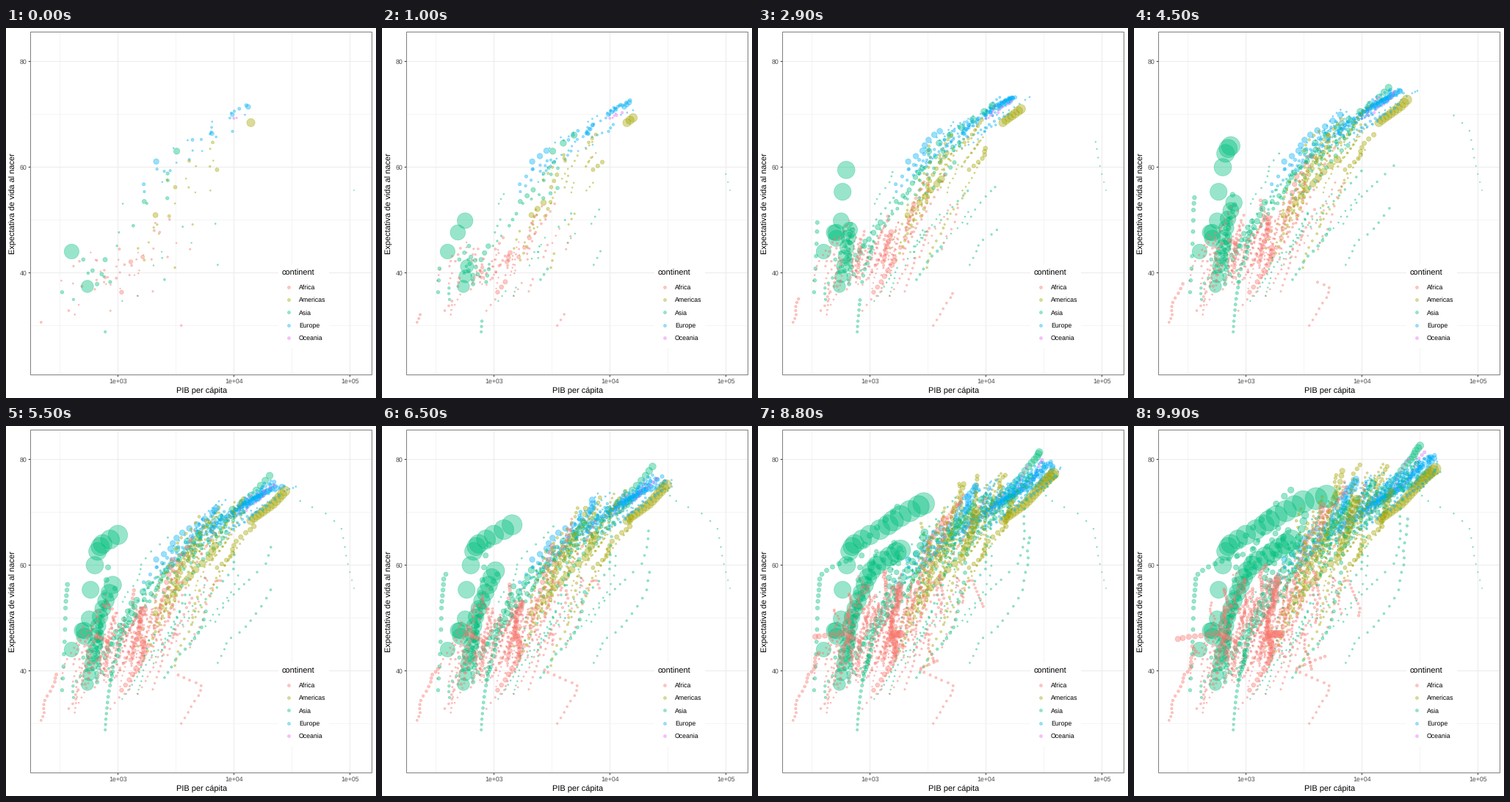
Recreate the animation shown at these times as a matplotlib script. Size 504 by 504 pixels, loop 10 s.

```python
import numpy as np
import matplotlib.pyplot as plt
from matplotlib.animation import FuncAnimation
from matplotlib.colors import to_rgba
from matplotlib.patches import Rectangle

plt.rcParams["font.family"] = "Liberation Sans"
plt.rcParams["text.hinting"] = "none"

SIZE, FRAMES, TRAIL_STEP, KEYS = 504, 100, 5, 12
LEFT, RIGHT, TOP, BOTTOM = 33.5, 498.5, 5.5, 472.5
MAX_POP = 1319
TINTS = {"Africa": to_rgba("#F8766D", 0.4), "Americas": to_rgba("#A3A500", 0.4),
         "Asia": to_rgba("#00BF7D", 0.4), "Europe": to_rgba("#00B0F6", 0.4),
         "Oceania": to_rgba("#E76BF3", 0.4)}

rng = np.random.default_rng(11)
tracks, tints = [], []


def px(log_income):
    return LEFT + (log_income - 2.2487) * (RIGHT - LEFT) / 2.9401


def py(life):
    return BOTTOM - (life - 20.649) * (BOTTOM - TOP) / 64.904


def radius(pop):
    size = 0.1 + 13.9 * np.sqrt(np.clip(pop - 0.06, 0, None) / MAX_POP)
    return 0.375 * (size * 2.845 + 0.945)


def bridge(scale):
    """Random walk over the key years that starts and ends at zero."""
    walk = np.cumsum(rng.normal(0, scale, KEYS))
    return walk - np.linspace(walk[0], walk[-1], KEYS)


def bubble(continent, pop, growth, knots, wobble=1.0):
    """Add one bubble; knots are (log income, life), evenly spaced in time."""
    knots = np.asarray(knots, float)
    t, at = np.linspace(0, 1, KEYS), np.linspace(0, 1, len(knots))
    income = np.interp(t, at, knots[:, 0]) + bridge(0.025) * wobble
    life = np.interp(t, at, knots[:, 1]) + bridge(0.25) * wobble
    r = radius(pop * (1 + (growth - 1) * t))
    time = np.linspace(0, 1, FRAMES)
    tracks.append([np.interp(time, t, v) for v in (px(income), py(life), r)])
    tints.append(TINTS[continent])


def leader(continent, pop, growth, *knots, wobble=0.3):
    bubble(continent, pop, growth, [(np.log10(g), life) for g, life in knots], wobble)


def cohort(continent, n, pop, growth, spread, poor, rich):
    """Add n bubbles scattered between the poorest and the richest path."""
    poor, rich = np.array(poor), np.array(rich)
    for u in np.linspace(0, 1, n):
        path = poor + (rich - poor) * u + rng.normal(0, spread, 2)
        size = np.clip(pop * np.exp(rng.normal(0, 1)), 0.1, 65)
        bubble(continent, size, growth, path)


# Bubbles that stand out
leader("Asia", 556, 2.37, (400, 44), (576, 50.5), (488, 44.5), (613, 58.4),
       (677, 63.1), (741, 64), (962, 65.5), (1379, 67.3), (1656, 68.7),
       (2289, 70.4), (3119, 72), (4959, 73), wobble=0)
leader("Asia", 372, 2.98, (547, 37.4), (718, 49.6), (1050, 59.2), (2452, 64.7))
leader("Asia", 86, 1.48, (3217, 63), (13500, 72.9), (23500, 79), (31656, 82.6))
leader("Asia", 26, 3.2, (605, 40.4), (690, 49.3), (860, 64.7), (2442, 74.2))
leader("Asia", 20, 2.4, (331, 36.3), (355, 51.5), (370, 58.7), (944, 62))
leader("Asia", 8.4, 3.8, (779, 28.8), (870, 39), (975, 43.8))
leader("Asia", 0.16, 15, (108382, 55.6), (92000, 61.4), (86000, 68.3),
       (29600, 73), (39000, 76), (47307, 77.6))
leader("Americas", 157.6, 1.91, (13990, 68.4), (21000, 71.2), (30500, 75.3),
       (42952, 78.2))
leader("Americas", 56.6, 3.36, (2109, 50.9), (6850, 62.4), (9066, 72.4))
leader("Africa", 33, 4.1, (1077, 36.3), (1650, 43), (1500, 47), (2014, 46.9))
leader("Africa", 14, 4.6, (781, 39.1), (890, 45.5), (600, 47), (260, 46))
leader("Africa", 4.2, 2.9, (3521, 30), (5500, 37), (2500, 40.2), (4797, 42.7))

# Everyone else: poorest and richest path at the start, middle and end
cohort("Asia", 4, 45, 3.2, (0.03, 1),
       [(2.83, 37.5), (2.85, 47), (3.1, 64)], [(2.88, 42), (3.2, 54), (3.5, 69)])
cohort("Asia", 13, 8, 2.6, (0.12, 2.5),
       [(2.7, 36), (2.85, 47), (3.1, 62)], [(3.45, 61), (4.0, 72), (4.55, 81)])
cohort("Asia", 10, 2, 5, (0.1, 3.5),
       [(3.0, 37), (3.2, 46), (3.4, 66)], [(3.9, 48), (4.35, 60), (4.45, 75)])
cohort("Americas", 23, 4, 2.5, (0.08, 3),
       [(3.2, 42), (3.45, 56), (3.5, 68)], [(3.85, 64), (4.05, 71), (4.25, 78)])
cohort("Europe", 14, 9, 1.25, (0.06, 0.7),
       [(3.72, 66.3), (4.15, 72.5), (4.45, 79)],
       [(4.1, 72), (4.33, 75.3), (4.6, 80.8)])
cohort("Europe", 16, 6, 1.3, (0.07, 1.3),
       [(3.2, 56), (3.7, 68), (3.85, 74)], [(3.85, 67), (4.2, 72), (4.42, 78)])
cohort("Africa", 34, 3, 3.6, (0.11, 3),
       [(2.6, 36), (2.75, 45), (2.8, 50)], [(3.25, 41), (3.4, 51), (3.4, 57)])
cohort("Africa", 8, 2.5, 3.4, (0.08, 2.5),
       [(2.8, 42), (3.0, 53), (2.95, 43)], [(3.65, 45), (3.9, 58), (4.0, 51)])
cohort("Africa", 7, 4, 3, (0.05, 1.5),
       [(3.18, 42), (3.42, 59), (3.6, 71)], [(3.42, 50), (3.75, 65), (4.0, 75)])
cohort("Oceania", 2, 4, 2.1, (0.005, 0.2),
       [(4.02, 69.4), (4.23, 73.7), (4.4, 80.2)],
       [(4.0, 69.1), (4.3, 74.3), (4.54, 81.2)])

order = rng.permutation(len(tracks))
tracks = np.array(tracks)[order].transpose(2, 0, 1)
tints = np.array(tints)[order]

fig = plt.figure(figsize=(7, 7), dpi=72, facecolor="white")
ax = fig.add_axes([0, 0, 1, 1])
ax.set_xlim(0, SIZE)
ax.set_ylim(SIZE, 0)
ax.axis("off")


def mid(v):
    """Centre of the pixel that holds v."""
    return np.floor(v) + 0.5


def line(x, y, color="#EBEBEB", width=1, z=1):
    ax.plot(x, y, color=color, lw=width, zorder=z, solid_capstyle="butt", snap=False)


def label(x, y, text, size=8.8, color="black", **kw):
    ax.text(x, y, text, fontsize=size, color=color, va="baseline", zorder=6, **kw)


# Grid, ticks and panel border
for v in (2.5, 3.5, 4.5):
    line([px(v)] * 2, [TOP, BOTTOM], width=0.53, z=0)
for v in (30, 50, 70):
    line([LEFT, RIGHT], [py(v)] * 2, width=0.53, z=0)
for v in (3, 4, 5):
    x = mid(px(v))
    line([x, x], [TOP, BOTTOM])
    line([x, x], [BOTTOM, BOTTOM + 2.75], "#333333")
    label(px(v), 484, f"1e+0{v}", color="#4D4D4D", ha="center")
for v in (40, 60, 80):
    y = mid(py(v))
    line([LEFT, RIGHT], [y, y])
    line([LEFT - 2.75, LEFT], [y, y], "#333333")
    label(28.5, py(v) + 3.2, str(v), color="#4D4D4D", ha="right")
ax.add_patch(Rectangle((LEFT, TOP), RIGHT - LEFT, BOTTOM - TOP, fill=False,
                       ec="#7F7F7F", lw=1, zorder=4, snap=False))
label(266.2, 497, "PIB per cápita", 11, ha="center")
label(13, 239, "Expectativa de vida al nacer", 11, ha="center",
      rotation=90, rotation_mode="anchor")

# Legend
ax.add_patch(Rectangle((370.5, 322.5), 69.5, 113.8, fc="white", ec="none", zorder=5))
label(376, 337, "continent", 11)
for i, (name, tint) in enumerate(TINTS.items()):
    y = 352.7 + 17.28 * i
    ax.scatter([384.7], [y], s=3.9 ** 2, color=[tint], lw=0.71, zorder=6)
    label(398.8, y + 3.2, name)

bubbles = ax.scatter([], [], lw=0.71, zorder=3)


def update(i):
    shown = list(range(0, i, TRAIL_STEP)) + [i]
    pts = tracks[shown].reshape(-1, 3)
    colors = np.tile(tints, (len(shown), 1))
    bubbles.set_offsets(pts[:, :2])
    bubbles.set_sizes((2 * pts[:, 2]) ** 2)
    bubbles.set_facecolor(colors)
    bubbles.set_edgecolor(colors)
    return [bubbles]


anim = FuncAnimation(fig, update, frames=FRAMES, interval=100,
                     repeat=True, repeat_delay=0)
plt.show()
```
